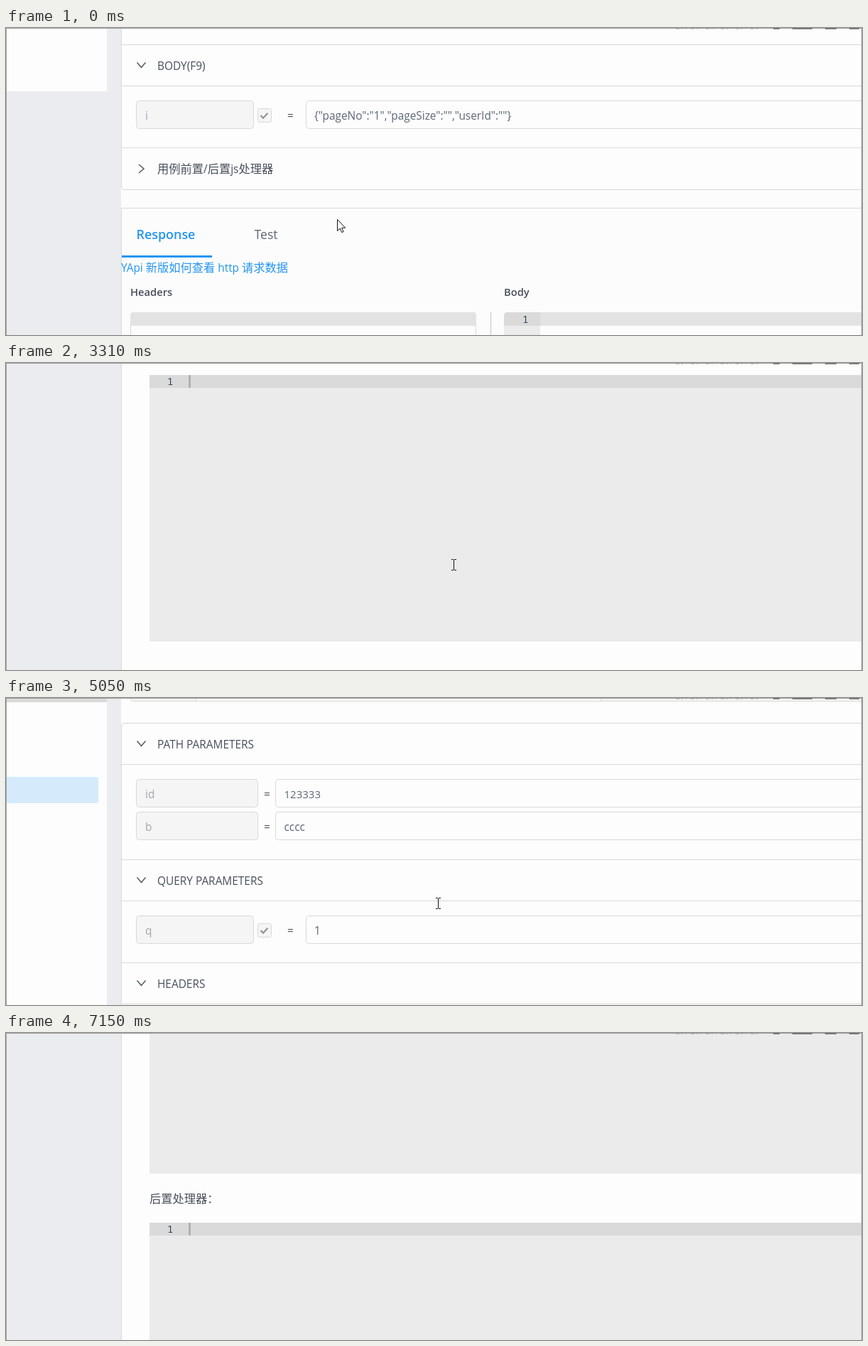
An HTML page that plays this animation: 1205 by 432 pixels, repeating every 7.43 s.

```html
<!DOCTYPE html>
<html lang="zh-CN">
<head>
<meta charset="utf-8">
<title>API test case</title>
<style>
html, body { margin: 0; width: 100%; height: 100%; overflow: hidden; background: #ebecf0; }
svg { display: block; }
text { font: 15.4px "Open Sans", "Noto Sans CJK SC", "Noto Sans CJK", sans-serif; fill: #5d6577; white-space: pre; }
.c { font-size: 16.25px; }
.h { fill: #474e5b; }
.dim { fill: #a3a6ae; }
.nav { font-size: 17.5px; }
.blue { fill: #2395f1; }
.b { font-weight: 600; font-size: 14.7px; fill: #474e5b; }
.n { font: 14px "Noto Sans Mono", monospace; fill: #26485a; }
.box { fill: #fdfdfd; stroke: #d9d9d9; }
.off { fill: #f5f5f5; stroke: #d9d9d9; }
.line { fill: none; stroke: #d9d9d9; }
.chev { fill: none; stroke: #555b66; stroke-width: 1.5; }
.pale { stroke: #9a9da3; stroke-width: 1.3; }
#cursor > g { display: none; }
</style>
</head>
<body>
<svg width="1205" height="432" viewBox="0 0 1205 432">
<defs>
  <path id="chev" d="M-6-3.5 0 3.5 6-3.5"/>
  <g id="check">
    <rect class="off" x="354.5" y="11.5" width="19" height="19" rx="2"/>
    <path d="M358.5 21l3.5 3.7 6.5-7" fill="none" stroke="#8d929c" stroke-width="2.2"/>
  </g>
  <g id="row">
    <rect class="off" x="183.5" y=".5" width="171" height="39" rx="4"/>
    <text class="h" x="363" y="27">=</text>
    <rect class="box" x="379.5" y=".5" width="900" height="39" rx="4"/>
  </g>
  <g id="checkrow">
    <rect class="off" x="183.5" y=".5" width="165" height="39" rx="4"/>
    <use href="#check"/>
    <text class="h" x="396" y="27">=</text>
    <rect class="box" x="422.5" y=".5" width="900" height="39" rx="4"/>
  </g>
  <g id="editor">
    <rect x="202" width="1003" height="375" fill="#ebebeb"/>
    <rect x="202" width="1003" height="18" fill="#dadada"/>
    <rect x="257" width="3" height="18" fill="#b0b0b0"/>
    <text class="n" x="227" y="14">1</text>
  </g>
</defs>

<rect width="1205" height="432" fill="#ebecf0"/>
<g id="page">
  <!-- navigation -->
  <rect width="1205" height="65" fill="#fdfdfd"/>
  <text class="nav" x="71" y="38">数据管理</text>
  <text class="nav" x="231.500" y="38">设 置</text>
  <text x="362" y="38" style="font-size:17px">Wiki</text>

  <!-- sidebar -->
  <rect y="95" width="142" height="743" fill="#fdfdfd"/>
  <path d="M0 95h140v49h2v70H0z" fill="#dbdbdb"/>
  <text class="blue" x="8" y="127" style="font-size:20px">测试集合</text>
  <rect x="-9" y="159" width="13" height="40" rx="4" fill="#fdfdfd"/>
  <rect x="15" y="159" width="107" height="40" rx="5" fill="#2395f1"/>
  <text class="c" x="36" y="186" style="fill:#fff">添加集合</text>
  <rect x="-9" y="319" width="139" height="37" rx="3" fill="#d5ebfb"/>

  <!-- request -->
  <rect x="162" y="95" width="1043" height="2000" fill="#fdfdfd"/>
  <rect class="box" x="172.500" y="103.500" width="1100" height="39" rx="4"/>
  <text x="185" y="132" style="font-size:21.5px">p1_copy</text>
  <rect class="off" x="175.500" y="173.500" width="1100" height="39" rx="4"/>
  <rect class="box" x="267.500" y="173.500" width="569" height="39"/>
  <text class="dim" x="190" y="199">POST</text>
  <use class="chev pale" href="#chev" x="245" y="193"/>
  <text class="h" x="282" y="199">mock<tspan class="c">：</tspan>http://restapi.quvideo.com/mock/348</text>
  <use class="chev pale" href="#chev" x="815" y="193"/>
  <text class="dim" x="848" y="200" style="font-size:15.2px">/testbasepath/p1_1563849663405{id}/{b}</text>

  <path class="line" d="M1205 243.500H167q-4.500 0-4.500 4.500V2100"/>
  <path class="line" d="M163 301.500h1042M163 435.500h1042M163 493.500h1042M163 580.500h1042M163 638.500h1042M163 772.500h1042M163 830.500h1042M163 917.500h1042M163 975.500h1042"/>

  <use class="chev" href="#chev" x="190.500" y="272"/>
  <text class="h" x="213" y="279">PATH PARAMETERS</text>
  <use href="#row" y="322"/>
  <text class="dim" x="196" y="349">id</text>
  <text x="391.500" y="349" style="font-size:15px">123333</text>
  <use href="#row" y="368"/>
  <text class="dim" x="196" y="395">b</text>
  <text x="391.500" y="395">cccc</text>

  <use class="chev" href="#chev" x="190.500" y="464"/>
  <text class="h" x="213" y="471">QUERY PARAMETERS</text>
  <use href="#checkrow" y="514"/>
  <text class="dim" x="196" y="541">q</text>
  <text x="434" y="541">1</text>

  <use class="chev" href="#chev" x="190.500" y="609"/>
  <text class="h" x="213" y="616">HEADERS</text>
  <use href="#row" y="659"/>
  <text class="dim" x="196" y="686">Content-Type</text>
  <text x="391.500" y="686">application/json</text>
  <use href="#row" y="705"/>
  <text class="dim" x="196" y="732">dsfsdfsfsd</text>
  <text x="391.500" y="732">sdfsdfsdfsdfsd</text>

  <use class="chev" href="#chev" x="190.500" y="801"/>
  <text class="h" x="213" y="808">BODY(F9)</text>
  <use href="#checkrow" y="851"/>
  <text class="dim" x="196" y="878">i</text>
  <text x="434" y="878">{"pageNo":"1","pageSize":"","userId":""}</text>

  <g transform="translate(190.500 947)"><use id="arrow" class="chev" href="#chev"/></g>
  <text class="h" x="213" y="953"><tspan class="c">用例前置</tspan>/<tspan class="c">后置</tspan>js<tspan class="c">处理器</tspan></text>

  <!-- scripts -->
  <text class="c h" x="202" y="1044">前置处理器：</text>
  <use href="#editor" y="1072"/>
  <text class="c h" x="202" y="1488">后置处理器：</text>
  <use href="#editor" y="1516"/>

  <!-- response -->
  <g id="response">
    <rect x="162" y="972" width="1043" height="1200" fill="#fcfcfc"/>
    <path class="line" d="M162.500 970v2q0 4.500 4.500 4.500H1205M162.500 1300V1002.500H1205"/>
    <text class="blue" x="183.500" y="1046" style="font-size:17.900px;font-weight:600">Response</text>
    <text x="349.500" y="1046" style="font-size:17.600px">Test</text>
    <rect x="163" y="1069" width="127" height="3" fill="#2395f1"/>
    <text class="blue" x="162" y="1092">YApi <tspan class="c">新版如何查看</tspan> http <tspan class="c">请求数据</tspan></text>
    <text class="b" x="175" y="1126">Headers</text>
    <text class="b" x="701" y="1126">Body</text>
    <rect class="line" x="175.500" y="1149.500" width="486" height="300" rx="4"/>
    <path d="M175 1168v-14q0-5 5-5h477q5 0 5 5v14z" fill="#e3e3e3"/>
    <path class="line" d="M682.500 1149v300" style="stroke:#c4c4c4"/>
    <path d="M701 1450V1154q0-5 5-5h46v301z" fill="#ebebeb"/>
    <path d="M701 1168v-14q0-5 5-5h499v19z" fill="#e3e3e3"/>
    <path d="M701 1168v-14q0-5 5-5h46v19z" fill="#dadada"/>
    <text class="n" x="727" y="1164">1</text>
  </g>
</g>

<path d="M.5 432V.5h1204V432" fill="none" stroke="#a0a0a0"/>
<path d="M943 1h118" stroke="#9a9a9a" stroke-dasharray="5 3 2 4 1 6"/>
<path d="M1080 1h9M1107 1h28M1153 1h16M1187 1h14" stroke="#333"/>

<g id="cursor">
  <g id="pointer"><path d="M.5.500v16l3.700-3.500 2.500 5.600 2.400-1-2.400-5.400h5z" fill="#fff" stroke="#111"/></g>
  <g id="beam"><path d="M0 .500h3M4 .500h3M3.500 1v14M0 15.500h3M4 15.500h3" fill="none" stroke="#111"/></g>
  <g id="hand"><path d="M4.500 14V2.500q0-2 1.700-2t1.800 2V8q1.800-1.200 2.800.500 1.800-.900 2.700.700 2.500-.500 2.500 2.300v5q0 2-1.500 4v2.500H6.500v-2.300L1.800 14.800q-2-2.800-.300-3.600 1.400-.400 3 2.800M8 8v4M10.800 8.500V12M13.500 9.500v3" fill="#fff" stroke="#111" stroke-width="1.100"/></g>
</g>
</svg>

<script>
const LOOP = 7430, OPEN_HEIGHT = 960;
const $ = id => document.getElementById(id);
const page = $('page'), arrow = $('arrow'), response = $('response'), cursor = $('cursor');

// bursts of repaints: start, end, count
const bursts = [
  [430, 1080, 6], [1370, 1770, 4], [1920, 2310, 4], [2610, 2730, 2], [2890, 3310, 4],
  [3590, 4600, 8], [4900, 5850, 8], [5990, 7000, 8], [7150, 7150, 1]
];
const ticks = [0];
for (const [start, end, n] of bursts)
  for (let k = 0; k < n; k++)
    ticks.push(start + (n > 1 ? Math.floor(k * (end - start) / (n - 1) / 10) * 10 : 0));

// time, scroll offset
const scroll = [
  [0, 749], [1770, 749], [2310, 1124], [2610, 1150], [2730, 1216], [2890, 1249], [3310, 1499],
  [3590, 1440], [4450, 90], [4600, 0], [4770, 0], [5570, 641], [5850, 1124], [6280, 1249], [LOOP, 1249]
];

// time, left, top, shape
const moves = [
  [0, 466, 269, 'pointer'], [300, 466, 269, 'pointer'], [820, 277, 225, 'hand'], [1080, 183, 203, 'hand'],
  [1500, 183, 203, 'hand'], [1630, 390, 245, 'pointer'], [1770, 591, 281, 'pointer'], [1920, 612, 276, 'beam'],
  [2050, 627, 276, 'beam'], [4310, 627, 276, 'beam'], [4600, 601, 288, 'hand'], [4900, 601, 288, 'hand'],
  [5030, 605, 281, 'beam'], [6270, 605, 281, 'beam'], [6710, 1073, 392, 'beam'], [7000, 836, 327, 'beam'],
  [7150, 836, 327, ''], [LOOP, 836, 327, '']
];

function at(keys, t, col) {
  const i = keys.findLastIndex(k => k[0] <= t);
  const a = keys[i], b = keys[i + 1] || a;
  const p = b === a ? 0 : (t - a[0]) / (b[0] - a[0]);
  return Math.round(a[col] + (b[col] - a[col]) * p);
}

const shift = (el, x, y) => el.setAttribute('transform', `translate(${x} ${y})`);

function draw() {
  const now = performance.now() % LOOP;
  const t = ticks.findLast(k => k <= now);
  const open = t < 1370 ? 0 : t < 1500 ? 0.25 : 1;
  const shape = moves.findLast(m => m[0] <= t)[3];
  shift(page, 0, -at(scroll, t, 1));
  shift(response, 0, open * OPEN_HEIGHT);
  arrow.setAttribute('transform', `rotate(${open < 1 ? -90 + open * 180 : 0})`);
  shift(cursor, at(moves, t, 1), at(moves, t, 2));
  for (const g of cursor.children) g.style.display = g.id === shape ? 'inline' : 'none';
  requestAnimationFrame(draw);
}
draw();
</script>
</body>
</html>
```
